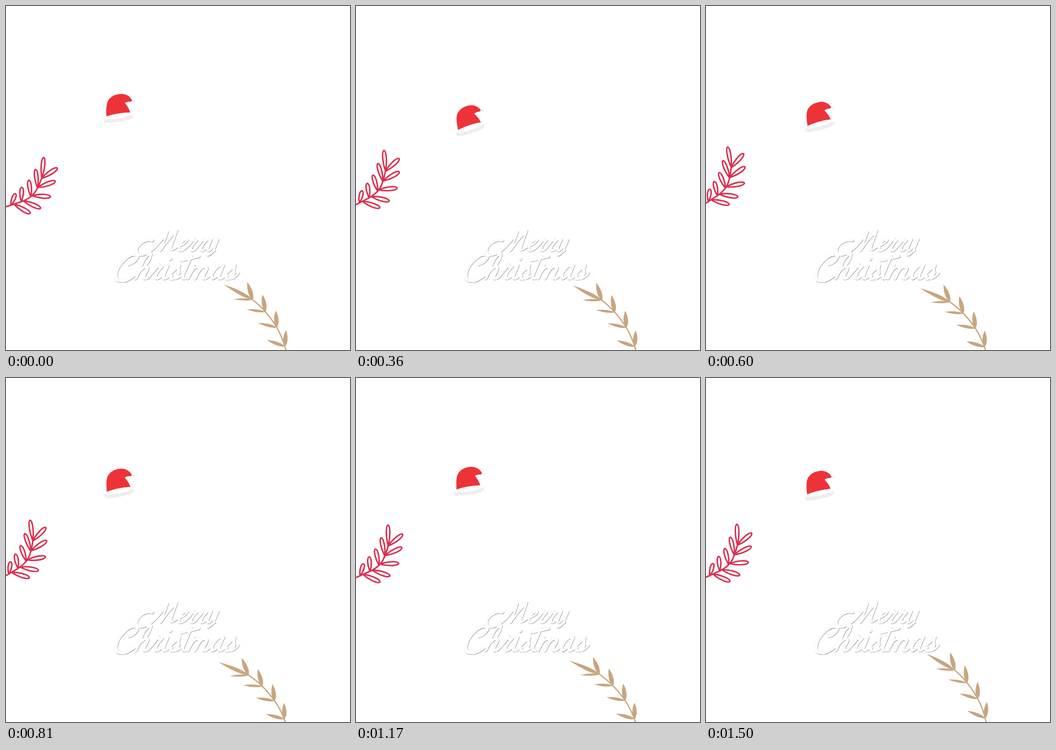
Animation, 720 px wide and 720 px high, one loop 1.53 s. Source, as an HTML page:

```html
<!DOCTYPE html>
<html lang="en">
<head>
<meta charset="utf-8">
<title>Merry Christmas</title>
<style>
  html, body { margin: 0; width: 100%; height: 100%; overflow: hidden; background: #fff; }
  svg { display: block; width: 720px; height: 720px; }
  .line { fill: none; stroke-linecap: round; stroke-linejoin: round; }
</style>
</head>
<body>
<svg viewBox="0 0 720 720">
  <defs><g id="words" class="line"></g></defs>

  <g role="img" aria-label="Merry Christmas">
    <use href="#words" stroke="#f2f2f2" stroke-width="2.6"/>
    <use href="#words" stroke="#777" stroke-width="2.1" x=".6" y=".6"/>
    <use href="#words" stroke="#fff" stroke-width="2.1"/>
  </g>

  <g id="hat">
    <path fill="#ee3338" d="M210 231C210 217 209 205 215 196C221 188 231 184 242 184C254 184 262 192 265 200C259 200 253 200 249 203C254 209 258 216 260 223C243 223 226 226 210 231Z"/>
    <circle cx="266" cy="200.5" r="3.5" fill="#eee"/>
    <circle cx="264" cy="202.5" r="3" fill="#fff"/>
    <path fill="#eee" d="M205 236C204 241 206 244 211 244.5C231 244 250 241 263 236C267 234 268 230 266 226Z"/>
    <path fill="#fff" d="M206 236C206 232 209 231 212 231C228 226 244 223 261 223C267 224 267 227 264 228C246 235 227 238 206 236Z"/>
  </g>

  <g id="red" class="line" stroke="#d9304e" stroke-width="3.1">
    <path d="M-10 423C2 420 12 416 28 411C44 406 56 398 63 386C70 374 72 368 75 360"/>
  </g>

  <g id="gold" fill="#c8a57f">
    <path class="line" stroke="#c8a57f" stroke-width="2.6" d="M588 728C583 708 577 690 567 673C555 653 539 632 516 614"/>
  </g>
</svg>
<script>
const $ = id => document.getElementById(id);

function add(parent, tag, attrs) {
  const el = document.createElementNS('http://www.w3.org/2000/svg', tag);
  for (const k in attrs) el.setAttribute(k, attrs[k]);
  parent.append(el);
  return el;
}

// Script letters: x-height 10, baseline 0, joined by shared strokes.
const TAIL = 'q0 3 2 3t3-4', STEM = 'M0-4L1-10V-3', HUMP = 'q0-9 3.5-9t2 6';
const glyphs = {
  M: 'M11-9C5-11-1-6 0-1C1 4 6 5 10 3C16 0 19-9 21-17L22 0Q24-9 29-18L30-3Q31 2 36-4',
  C: 'M8-11C13-12 14-19 9-18.5C3-18 0-9 1-5C2 2 6 2 10 2Q14 1 18-5',
  a: 'M7-9Q4-12 2-7T3 0Q6 0 7-10V-3' + TAIL,
  e: 'M0-4C5-5 8-10 5-10C1-10 0 0 4 0Q7 0 9-4',
  h: 'M0-5Q5-11 4-17T0-14V0' + HUMP + TAIL,
  i: 'M1-15v.1' + STEM + TAIL,
  m: 'M0-10V0' + HUMP + 'v3' + HUMP + TAIL,
  r: 'M0-4Q2-7 2-11Q4-8 6-9Q4-6 4-3' + TAIL,
  s: 'M0-4L4-10Q4-7 5.5-5T4 0Q1 1 1-2M4 0Q8 0 9-4',
  t: 'M-5-14L7-17M1-17V-3' + TAIL,
  y: STEM + 'q0 3 2 3T7-10V0Q6 4 4 4T8 0'
};

// Each letter starts where the one before it ended.
function write(word, x, y, size) {
  const g = add($('words'), 'g', { transform: `translate(${x} ${y}) skewX(-23) scale(${size})` });
  let pen = 0;
  for (const c of word) {
    const p = add(g, 'path', { d: glyphs[c], transform: `translate(${pen})` });
    pen += p.getPointAtLength(p.getTotalLength()).x;
  }
}
write('Merry', 273, 512, 2.3);
write('Christmas', 223.4, 570.5, 2.7);

// A leaf on the stem of a sprig; a and b set where it is widest.
function leaf(sprig, dist, turn, len, w, a, b) {
  const { x, y } = sprig.firstElementChild.getPointAtLength(dist);
  add(sprig, 'path', {
    d: `M0 0C${a * len} ${-w} ${b * len} ${-w} ${len} 0C${b * len} ${w} ${a * len} ${w} 0 0Z`,
    transform: `translate(${x} ${y}) rotate(${turn})`
  });
}

for (let i = 0; i < 5; i++) {
  leaf($('red'), 21 + 23 * i, -68 - 25 * i + 5.2 * i * i, 26 + 4.3 * i, 5, .45, .95);
  leaf($('red'), 28 + 21 * i, 32 * Math.cos(.75 * i - .1) - 2, 39, 5.4, .45, .95);
}
for (let i = 0; i < 4; i++) {
  const dist = 16 + 45 * i - 1.6 * i * i;
  leaf($('gold'), dist, -86 - 7 * i, 34 + 1.6 * i, 6.2, .2, .6);
  leaf($('gold'), dist, -160 - 6 * i, 40, 4.8 - .6 * i, .2, .6);
}
leaf($('gold'), 137, -152, 68, 5.2, .2, .5);

// Keys are [ms, value]; each span eases along a half cosine.
const drop = [[0, 0], [342, 24], [1029, .5], [1619, 11.5]];
const redTurn = [[0, 0], [620, -15.1], [1230, -5.4], [1830, -8.5]];
const goldTurn = [[0, -.15], [110, 0], [960, -5.1], [1860, 5.9]];

function at(keys, t) {
  const i = keys.findIndex(k => k[0] > t);
  const [t0, v0] = keys[i - 1], [t1, v1] = keys[i];
  return v0 + (v1 - v0) * (1 - Math.cos(Math.PI * (t - t0) / (t1 - t0))) / 2;
}

const LOOP = 1530, STEP = 30;
const move = (id, value) => $(id).setAttribute('transform', value);

function draw() {
  const t = Math.floor(performance.now() % LOOP / STEP) * STEP;
  const y = at(drop, t);
  move('hat', `translate(0 ${y}) rotate(${-.39 * y} 240 212)`);
  move('red', `rotate(${at(redTurn, t)} -21 433)`);
  move('gold', `rotate(${at(goldTurn, t)} 602 728)`);
  requestAnimationFrame(draw);
}
draw();
</script>
</body>
</html>
```
